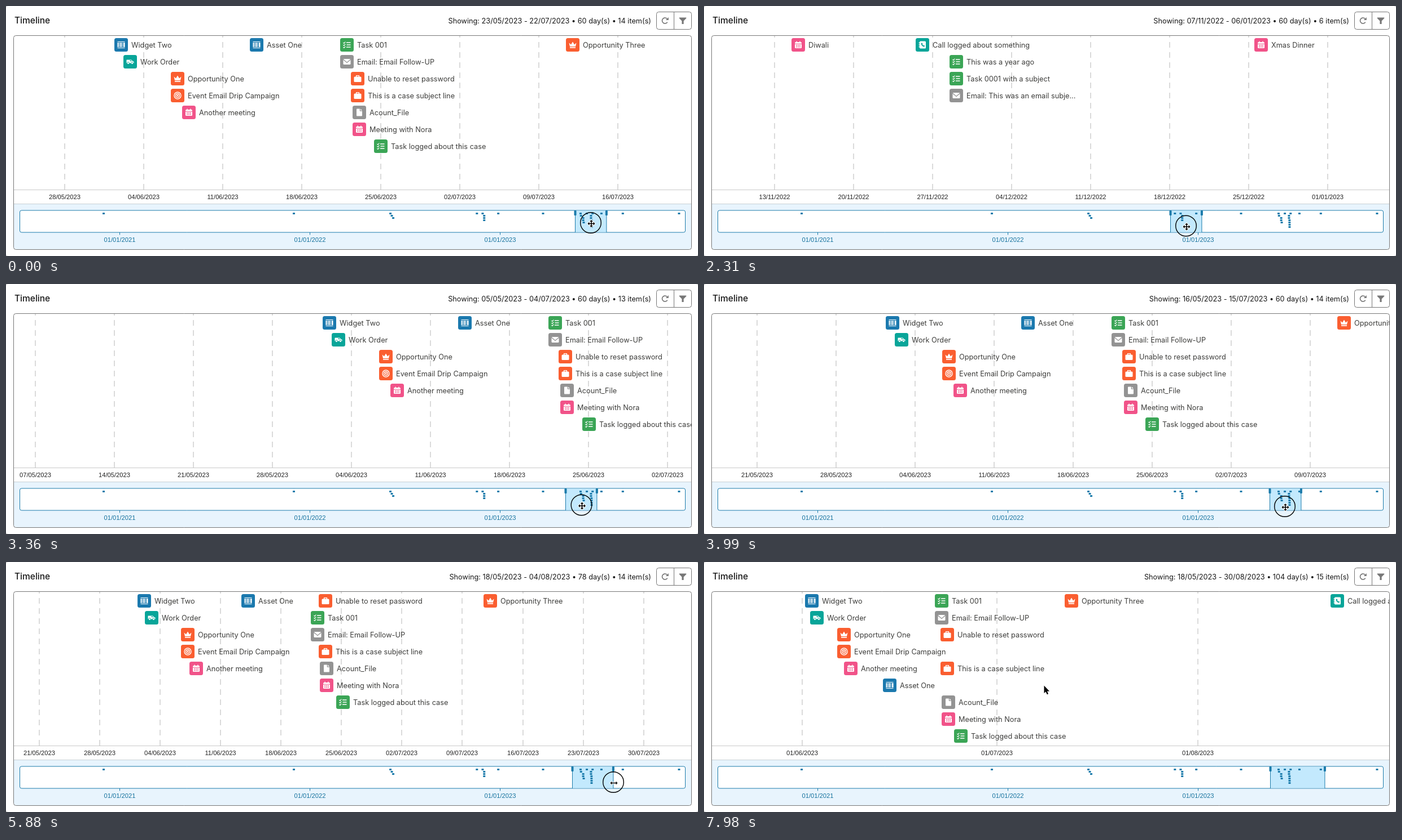
An HTML page with a canvas that plays this animation: 1226x444 px, repeating every 8 s.

```html
<!DOCTYPE html>
<html lang="en">
<head>
<meta charset="utf-8">
<title>Timeline</title>
<style>
html, body { margin: 0; width: 100%; height: 100%; overflow: hidden; background: #fff; }
canvas { display: block; width: 1226px; height: 444px; }
</style>
</head>
<body>
<canvas id="stage"></canvas>
<script>
const W = 1226, H = 444, LOOP = 8000, STEP = 70;
const LEFT = 14, RIGHT = 1214, PLOT = RIGHT - LEFT;
const BLUE = '#1b7bab', GREY = '#777';
const BODY_FONT = '12.73px Inter, sans-serif';
const AXIS_FONT = '11.2px "Liberation Sans", sans-serif';

const canvas = document.getElementById('stage');
const dpr = window.devicePixelRatio || 1;
canvas.width = W * dpr;
canvas.height = H * dpr;
const g = canvas.getContext('2d');

// Dates are days since 1 January 2023 (a Sunday).
const toDate = d => new Date(Date.UTC(2023, 0, 1) + d * 864e5);
const fmt = d => toDate(d).toLocaleDateString('en-GB', { timeZone: 'UTC' });
const overX = d => 876 + 0.9235 * d;

const items = [
  [-763.6], [-398.7], [-213.5], [-210.8], [-208.1],
  [-47.53, 'event', 'Diwali'],
  [-36.53, 'call', 'Call logged about something'],
  [-33.53, 'task', 'This was a year ago'],
  [-33.53, 'task', 'Task 0001 with a subject'],
  [-33.53, 'email', 'Email: This was an email subje...'],
  [-6.56, 'event', 'Xmas Dinner'],
  [79.4, 'event', 'Planning meeting'],
  [151.375, 'asset', 'Widget Two'],
  [152.175, 'work', 'Work Order'],
  [156.375, 'deal', 'Opportunity One'],
  [156.375, 'campaign', 'Event Email Drip Campaign'],
  [157.375, 'event', 'Another meeting'],
  [163.375, 'asset', 'Asset One'],
  [171.375, 'task', 'Task 001'],
  [171.375, 'email', 'Email: Email Follow-UP'],
  [172.3, 'case', 'Unable to reset password'],
  [172.3, 'case', 'This is a case subject line'],
  [172.44, 'file', 'Acount_File'],
  [172.44, 'event', 'Meeting with Nora'],
  [174.375, 'task', 'Task logged about this case'],
  [191.375, 'deal', 'Opportunity Three'],
  [232.375, 'call', 'Call logged about something'],
  [340.3]
].map(([day, kind = 'event', label = '']) => ({ day, kind, label }));

// Puts each item in the first lane that is free at its x.
function inLanes(list, x, width) {
  const ends = [];
  return list.map(item => {
    const at = x(item.day);
    let lane = ends.findIndex(end => end < at);
    if (lane < 0) lane = ends.length;
    ends[lane] = at + width(item);
    return { ...item, x: at, lane };
  });
}
const overview = inLanes(items, overX, () => 10);

// Smooth monotone curve through [time, value] points.
function track(points) {
  const n = points.length - 1;
  const slope = i => (points[i + 1][1] - points[i][1]) / (points[i + 1][0] - points[i][0]);
  const tangent = i => {
    if (i === 0 || i === n) return 0;
    const a = slope(i - 1), b = slope(i);
    return a * b > 0 ? 2 * a * b / (a + b) : 0;
  };
  return t => {
    if (t <= points[0][0]) return points[0][1];
    if (t >= points[n][0]) return points[n][1];
    const i = points.findIndex(p => p[0] > t) - 1;
    const [t0, v0] = points[i], [t1, v1] = points[i + 1];
    const h = t1 - t0, s = (t - t0) / h, r = 1 - s;
    return v0 * (1 + 2 * s) * r * r + v1 * s * s * (3 - 2 * s)
      + h * s * r * (tangent(i) * r - tangent(i + 1) * s);
  };
}
const startAt = track([[210, 142.5], [1050, -15.58], [1540, -54.8], [2240, -54.8],
  [2310, -54.55], [3360, 124.08], [3990, 135.995], [4130, 137.09]]);
const spanAt = track([[4760, 60], [5390, 60.4], [5530, 60.4], [5880, 78.41],
  [6370, 100.6], [6440, 102.3], [6720, 102.3], [6860, 104.42]]);
const mouseX = track([[210, 1036], [1050, 886], [1540, 853.7], [2240, 853.7], [2310, 854],
  [3360, 1019.5], [3990, 1029], [4130, 1030], [4270, 1030], [4620, 1060], [5530, 1060],
  [5880, 1076], [6370, 1096], [6440, 1098], [6720, 1098], [6860, 1100], [7560, 1100], [7980, 601]]);
const mouseY = track([[210, 385], [1050, 390], [2310, 390.5], [3360, 392.5], [3990, 395],
  [5530, 395], [5880, 391], [6440, 393.5], [7350, 394], [7560, 386], [7910, 206], [7980, 217.5]]);

function text(s, x, y, font, color, align = 'left') {
  g.font = font;
  g.fillStyle = color;
  g.textAlign = align;
  g.fillText(s, x, y);
}
function line(x0, y0, x1, y1, color, width = 1) {
  g.strokeStyle = color;
  g.lineWidth = width;
  g.beginPath();
  g.moveTo(x0, y0);
  g.lineTo(x1, y1);
  g.stroke();
}
function box(x, y, w, h, r, fill, stroke) {
  g.beginPath();
  g.roundRect(x, y, w, h, r);
  if (fill) { g.fillStyle = fill; g.fill(); }
  if (stroke) { g.strokeStyle = stroke; g.lineWidth = 1; g.stroke(); }
}
function shape(d, fill, stroke, width = 1) {
  const p = new Path2D(d);
  if (stroke) { g.strokeStyle = stroke; g.lineWidth = width; g.stroke(p); }
  if (fill) { g.fillStyle = fill; g.fill(p); }
}
function disc(x, y, r, fill) {
  g.fillStyle = fill;
  g.beginPath();
  g.arc(x, y, r, 0, 7);
  g.fill();
}

const white = '#fff';
// kind: [tile colour, glyph drawn around 0,0]
const icons = {
  asset: ['#1b79ae', () => {
    shape('M-6.5-6h13v1h-13zM-6.5 5h13v1h-13zM-6.5-4h2v8h-2zM-3.5-4h1v8h-1zM-1.5-4h2v8h-2zM1.5-4h1v8h-1zM4-4h2.5v8H4z', white);
  }],
  work: ['#08a599', () => {
    shape('M-6-3.5H2L4.5-1 6.5-.3V2.5H-6.5V-3z', white);
    for (const x of [-3.5, 3.5]) {
      disc(x, 2.5, 2.2, '#08a599');
      disc(x, 2.5, 1.5, white);
    }
    shape('M-.5-2.5H1.7L3-1H-.5z', '#08a599');
  }],
  deal: ['#fa5e30', () => {
    shape('M-6.5-3.5L-3-.5 0-5.5 3-.5 6.5-3.5 5 3H-5zM-5 4H5V5.8H-5z', white);
  }],
  campaign: ['#fa5e30', () => {
    for (const [r, c] of [[6.7, white], [5.3, '#fa5e30'], [4, white], [2.6, '#fa5e30'], [1.4, white]]) disc(0, 0, r, c);
  }],
  event: ['#f15389', () => {
    box(-6, -5, 12, 11, 1.5, white);
    shape('M-3.6-6.5h1.4v3h-1.4zM2.2-6.5h1.4v3H2.2z', white);
    g.fillStyle = '#f15389';
    g.fillRect(-6, -2.3, 12, 1);
    for (const y of [0, 2.8]) for (const x of [-3.8, -.9, 2]) g.fillRect(x, y, 1.8, 1.6);
  }],
  task: ['#3ba556', () => {
    for (const y of [-4, 0, 4]) {
      line(y ? -1 : -.5, y, 6.5, y, white, 1.5);
      shape(`M-6.5 ${y}l1.4 1.4 2.4-2.8`, null, white, 1.2);
    }
  }],
  email: ['#939393', () => {
    box(-6.5, -5, 13, 10, 1.5, white);
    shape('M-6.5-4L0 1.5 6.5-4', null, '#939393', 1.2);
  }],
  case: ['#fa5e30', () => {
    shape('M-2.4-3V-5.3H2.4V-3', null, white, 1.3);
    box(-6.5, -3.5, 13, 9.5, 1.5, white);
  }],
  file: ['#939393', () => {
    shape('M-5-5.5Q-5-6.5-4-6.5H.8V-2.3H5V5.5Q5 6.5 4 6.5H-4Q-5 6.5-5 5.5zM2-6.5L5-3.5H2z', white);
  }],
  call: ['#08a599', () => {
    box(-5, -6.5, 11, 13, 1.5, white);
    shape('M-6.5-4.2h2.5v1.4h-2.5zM-6.5-.7h2.5v1.4h-2.5zM-6.5 2.8h2.5v1.4h-2.5z', white);
    shape('M-1.3-2.4Q-1 1.8 3 2.4', null, '#08a599', 1.8);
    disc(-1, -2.2, 1.2, '#08a599');
    disc(2.8, 2, 1.2, '#08a599');
  }]
};

function drawHeader(start, end, count) {
  text('Timeline', 15, 31, '500 15.5px Inter, sans-serif', '#181818');
  const days = Math.round(end - start);
  text(`Showing: ${fmt(start)} - ${fmt(end)} • ${days} day(s) • ${count} item(s)`,
    1143, 30.5, BODY_FONT, '#181818', 'right');
  box(1152.5, 10.5, 62, 31, 4, white, GREY);
  line(1183.5, 10.5, 1183.5, 41.5, GREY);
  g.strokeStyle = GREY;
  g.lineWidth = 1.7;
  g.beginPath();
  g.arc(1167.5, 26, 5, .55, 5.5);
  g.stroke();
  shape('M1173.8 20v5h-5z', GREY);
  shape('M1193 20.5H1205Q1206 21 1205 22L1200.6 26.5V32H1197.4V26.5L1193 22Q1192 21 1193 20.5z', GREY);
}

function drawPlot(start, span, shown) {
  const x = d => LEFT + (d - start) * PLOT / span;
  g.save();
  g.beginPath();
  g.rect(LEFT, 53, PLOT, 298);
  g.clip();
  for (let d = Math.ceil(start); d <= start + span; d++) {
    const isTick = span < 87 ? d % 7 === 0 : toDate(d).getUTCDate() === 1;
    if (!isTick) continue;
    const tx = Math.round(x(d));
    g.setLineDash([10, 8]);
    line(tx, 326, tx, 53, '#d2d2d2', 1.6);
    g.setLineDash([]);
    text(fmt(d), tx, 342.5, AXIS_FONT, '#222', 'center');
  }
  line(LEFT, 326.5, RIGHT, 326.5, '#c9c9c9');
  g.beginPath();
  g.rect(LEFT, 53, PLOT, 273);
  g.clip();
  for (const item of shown) {
    const cx = Math.round(item.x + 12.8), cy = 69 + 30 * item.lane;
    const [color, glyph] = icons[item.kind];
    g.save();
    g.translate(cx, cy);
    box(-12, -12, 24, 24, 3.5, color);
    glyph();
    g.restore();
    text(item.label, cx + 18, cy + 4.7, BODY_FONT, '#3e3e3c');
  }
  g.restore();
}

function drawOverview(start, end) {
  box(14, 352, 1200, 80, [0, 0, 4, 4], '#e8f4fd');
  line(LEFT, 351.5, RIGHT, 351.5, '#c9d0d5');
  box(24.5, 363, 1179, 39, 3, white, BLUE);
  const a = overX(start) + .9, b = overX(end) + .9;
  g.fillStyle = '#c3e9fd';
  g.fillRect(a, 363.5, b - a, 38);
  for (const x of [a, b]) {
    line(x, 363, x, 402, BLUE);
    box(x - 2, 363, 4, 9, 1, BLUE);
  }
  for (const { x, lane } of overview) box(x + .2, 367 + 4 * lane, 4, 3, .5, BLUE);
  for (const d of [-730, -365, 0]) {
    const x = Math.round(overX(d)) - .5;
    line(x, 402, x, 406.5, BLUE);
    text(fmt(d), x, 418.5, AXIS_FONT, '#17739e', 'center');
  }
}

function drawMouse(t) {
  const x = mouseX(t), y = mouseY(t);
  if (t < 4130 || (t >= 4830 && t < 7350)) {
    g.strokeStyle = '#000';
    g.lineWidth = 1.4;
    g.beginPath();
    g.arc(x, y, 18.3, 0, 7);
    g.stroke();
  }
  g.save();
  g.translate(x + 1, y + 1.5);
  g.lineJoin = 'round';
  const sideArrow = 'M-6.5 0L-3.6-2.9V-.8H3.6V-2.9L6.5 0 3.6 2.9V.8H-3.6V2.9z';
  const upArrow = 'M0-6.5L2.9-3.6H.8V3.6H2.9L0 6.5-2.9 3.6H-.8V-3.6H-2.9z';
  if (t >= 7630) {
    shape('M.5.5V14L3.6 11.2 5.8 16.2 8 15.2 5.9 10.4H10z', '#000', '#fff', 2);
  } else if (t >= 4620) {
    shape(sideArrow, '#000', '#fff', 2);
  } else {
    const both = sideArrow + upArrow;
    shape(both, null, '#fff', 2);
    shape(both, '#000');
  }
  g.restore();
}

function draw(t) {
  const start = startAt(t), span = spanAt(t), end = start + span;
  const perDay = PLOT / span;
  const width = item => item.label.length * 6 + 80;
  const visible = items.filter(i => i.day < end && i.day + width(i) / perDay > start);
  const shown = inLanes(visible, d => LEFT + (d - start) * perDay, width);

  g.setTransform(dpr, 0, 0, dpr, 0, 0);
  g.fillStyle = '#c8c8c8';
  g.fillRect(0, 0, W, H);
  box(0, 0, W, H, 4, white);
  drawHeader(start, end, shown.length);
  drawPlot(start, span, shown);
  drawOverview(start, end);
  box(13.5, 52.5, 1201, 380, 4, null, GREY);
  drawMouse(t);
}

function frame(now) {
  const t = now % LOOP;
  draw(Math.floor(t / STEP) * STEP);
  requestAnimationFrame(frame);
}
requestAnimationFrame(frame);
</script>
</body>
</html>
```
